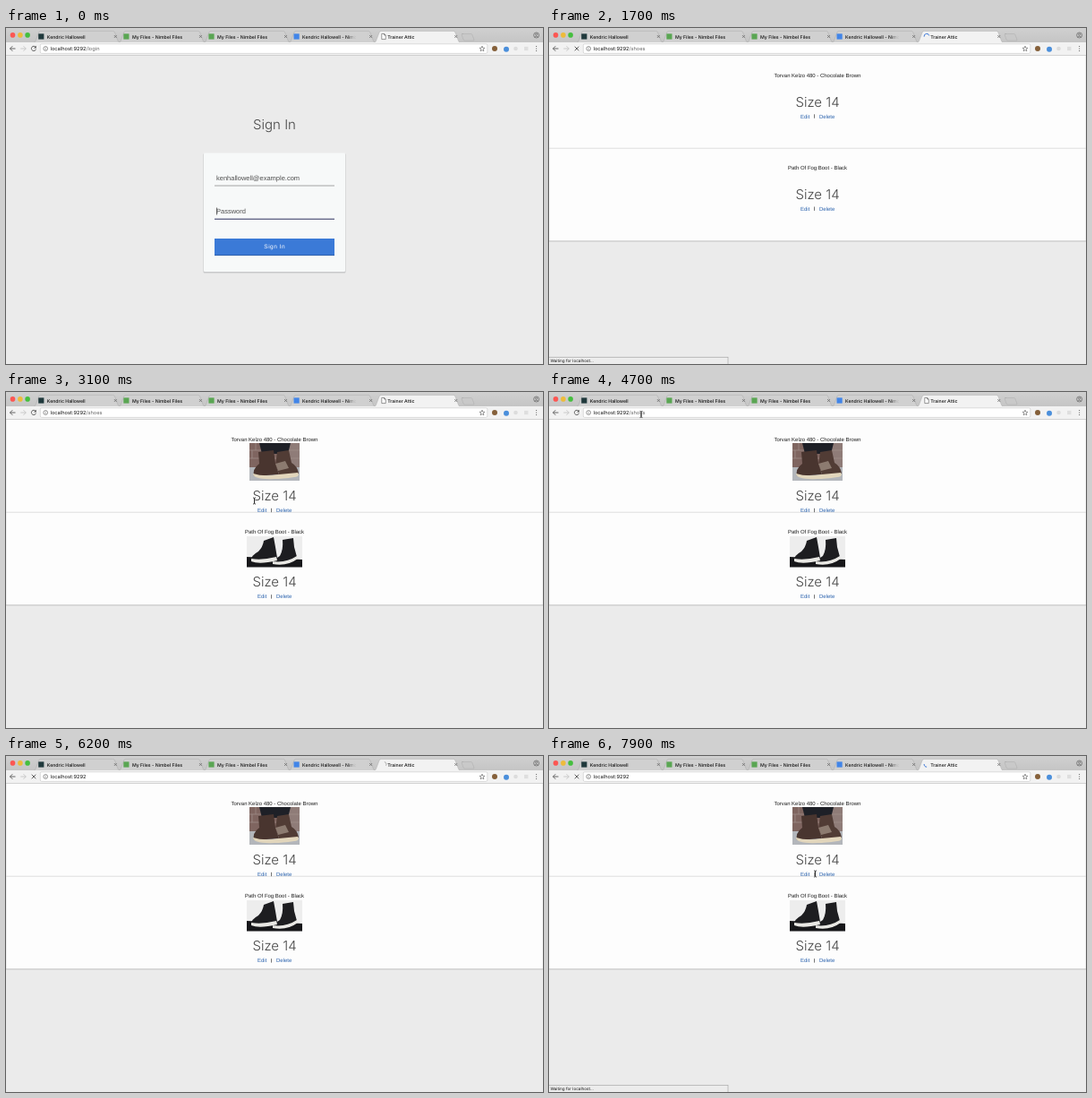
Recreate the animation shown at these times as an HTML page. Size 600 by 375 pixels, loop 8 s.

```html
<!DOCTYPE html>
<html lang="en">
<head>
<meta charset="utf-8">
<title>Trainer Attic</title>
<style>
html, body { margin: 0; width: 100%; height: 100%; overflow: hidden; background: #ebebeb }
svg { display: block; width: 600px; height: 375px; text-rendering: geometricPrecision; font-family: "Liberation Sans", Arial, sans-serif }
.ui { font-family: Inter, Roboto, sans-serif; font-size: 5.2px; font-weight: 500; fill: #111 }
.url { font-size: 5.7px; font-weight: 400 }
.tip { font-size: 4.6px; font-weight: 400 }
.big { font: 300 15px Inter, Roboto, sans-serif; fill: #444 }
.mid { text-anchor: middle }
.field { font-size: 7.5px; fill: #505050 }
.item { font-size: 5.98px; fill: #1c1c1c }
.link { fill: #2a62ad }
.line { fill: none; stroke: #555; stroke-width: .9 }
.thin { fill: none; stroke: #555; stroke-width: .6 }
</style>
</head>
<body>
<svg viewBox="0 0 600 375">
  <defs>
    <linearGradient id="strip" x2="0" y2="1"><stop stop-color="#d0d0d0"/><stop offset="1" stop-color="#c4c4c4"/></linearGradient>
    <linearGradient id="fade"><stop stop-color="#d0d0d0" stop-opacity="0"/><stop offset="1" stop-color="#d0d0d0"/></linearGradient>
    <clipPath id="crop1"><rect x="272" y="57" width="56" height="42"/></clipPath>
    <clipPath id="crop2"><rect x="269" y="161" width="62" height="34.5"/></clipPath>
  </defs>
  <rect width="600" height="375" fill="#ebebeb"/>

  <g id="login">
    <text class="big mid" x="300" y="113">Sign In</text>
    <rect x="220.5" y="140" width="159" height="133.5" rx="1" fill="#c8c9ca"/>
    <rect x="221" y="139.5" width="158" height="132.5" rx="1" fill="#f7f9f9"/>
    <text class="field" x="235" y="169.5">kenhallowell@example.com</text>
    <rect x="233" y="175.6" width="134" height=".8" fill="#8c8c8c"/>
    <text class="field" id="password" x="235" y="207"></text>
    <rect id="caret" y="200.5" width=".7" height="8" fill="#333"/>
    <rect x="233" y="212.6" width="134" height="1.4" fill="#66698a"/>
    <rect x="233" y="235" width="134" height="19" fill="#3b7ad7"/>
    <rect x="233" y="253.2" width="134" height=".9" fill="#2c5ca6"/>
    <text class="mid" x="300.2" y="246.2" font-size="6.5" letter-spacing=".5" fill="#fff">Sign In</text>
  </g>

  <g id="list">
    <rect y="30" width="600" height="208.4" fill="#bdbdbd"/>
    <rect x=".2" y="30" width="599.6" height="207.4" fill="#fdfdfd"/>
    <rect y="133.8" width="600" height=".7" fill="#d2d2d2"/>
    <g id="rows"></g>
    <g id="photos">
      <g clip-path="url(#crop1)">
        <rect x="272" y="57" width="56" height="42" fill="#7f6560"/>
        <rect x="316" y="57" width="12" height="27" fill="#8f7c78"/>
        <path d="M272 65h56M272 74h56M279 57v8M275 65v9" stroke="#a3918c" stroke-width=".7"/>
        <rect x="272" y="84" width="56" height="15" fill="#b3b6bb"/>
        <path d="M283 57h35l-3 12h-29z" fill="#1e2027"/>
        <path d="M282 67l17-2 2 15 4 12-28 2q-2-8 6-14z" fill="#49352f"/>
        <path d="M303 67l13-2 3 14q7 4 8 12l-21 3-5-12z" fill="#513c35"/>
        <path d="M301 80l11-3 4 8-12 3z" fill="#8c7b70"/>
        <path d="M276 91q12 4 29 1l21-2q3 4-4 5-14 2-22 2-24 1-24-6z" fill="#e2d6bc"/>
      </g>
      <g clip-path="url(#crop2)">
        <rect x="269" y="161" width="62" height="34.5" fill="#ededed"/>
        <path d="M269 184l62 3v9h-62z" fill="#17171a"/>
        <path d="M288 166l11-4 2 11 2 12-28 2q-2-4 7-9 5-5 6-12z" fill="#1d1d20"/>
        <path d="M309 165l12-2 1 10 3 11-8 6-18 1q0-4 7-8 4-7 3-18z" fill="#1d1d20"/>
        <path d="M274 186q12 2 28-2l1 4q-20 5-29 1zM298 189q15 2 27-6l1 3q-12 9-28 6z" fill="#e9e8e4"/>
      </g>
    </g>
  </g>

  <g id="status">
    <rect x="-.5" y="367.5" width="200.5" height="8" fill="#ececec" stroke="#aaa" stroke-width=".7"/>
    <text class="ui tip" x="1.5" y="373.2">Waiting for localhost...</text>
  </g>

  <rect width="600" height="17" fill="url(#strip)"/>
  <circle cx="7.5" cy="7.9" r="2.8" fill="#fc5753"/>
  <circle cx="15.9" cy="7.9" r="2.8" fill="#eebb3a"/>
  <circle cx="24.1" cy="7.9" r="2.8" fill="#45bf3e"/>
  <g id="tabs"></g>
  <path d="M509.5 6.5h10q1 0 1.4 1l2 5.5q.4 1-.8 1h-9.6q-1 0-1.4-1l-2-5.5q-.3-1 1.8-1z" fill="#c9c9c9" stroke="#aaa" stroke-width=".5"/>
  <g class="thin"><circle cx="592.6" cy="8" r="3"/><circle cx="592.6" cy="7.2" r="1.1"/><path d="M590.5 10.2q2.1-2 4.2 0"/></g>

  <rect y="16" width="600" height="14.5" fill="#f2f2f2"/>
  <rect y="30" width="600" height=".6" fill="#bbb"/>
  <path class="line" d="M10.5 23h-6M7.3 20.2L4.5 23l2.8 2.8"/>
  <path class="line" style="stroke:#c4c4c4" d="M16.3 23h6M19.5 20.2l2.8 2.8-2.8 2.8"/>
  <g id="reload"><path class="line" d="M33.1 21.4a2.6 2.6 0 1 0 .4 2.2"/><path d="M33.8 19.8v2.7h-2.7z" fill="#555"/></g>
  <path id="stop" class="line" d="M28.7 20.7l4.6 4.6M33.3 20.7l-4.6 4.6"/>
  <rect x="38.3" y="17.8" width="499.5" height="10.6" rx="1.5" fill="#fff" stroke="#c6c6c6" stroke-width=".6"/>
  <g class="thin"><circle cx="44.2" cy="23" r="2.4"/><path d="M44.2 22.6v1.8M44.2 21.3v.6"/></g>
  <rect id="selection" y="19.3" height="7.4" fill="#b3d4fc"/>
  <text class="ui url" x="49.5" y="25.1">localhost:9292<tspan id="path" fill="#666"></tspan></text>
  <path class="thin" d="M532 20.2l.8 2 2.1.1-1.6 1.4.5 2.1-1.8-1.2-1.8 1.2.5-2.1-1.6-1.4 2.1-.1z"/>
  <circle cx="546" cy="23" r="3" fill="#85603a"/>
  <circle cx="559" cy="23.8" r="3" fill="#4b8fdb"/>
  <circle cx="569.5" cy="23" r="2.3" fill="#dcdcdc"/>
  <rect x="579" y="20.8" width="4.4" height="4.4" fill="#dedede"/>
  <path d="M592.6 20.5v.01M592.6 23v.01M592.6 25.5v.01" stroke="#555" stroke-width="1.2" stroke-linecap="round"/>

  <g id="cursor" fill="none">
    <path d="M-1.5-3.6q1.5 0 1.5 1v5.2q0 1-1.5 1M1.5-3.6q-1.5 0-1.5 1v5.2q0 1 1.5 1" stroke="#fff" stroke-width="1.6"/>
    <path d="M-1.5-3.6q1.5 0 1.5 1v5.2q0 1-1.5 1M1.5-3.6q-1.5 0-1.5 1v5.2q0 1 1.5 1" stroke="#222" stroke-width=".8"/>
  </g>
</svg>
<script>
const LOOP = 8000;
const $ = id => document.getElementById(id);
const show = (id, on) => $(id).setAttribute('visibility', on ? 'visible' : 'hidden');
const set = (id, attrs) => { for (const k in attrs) $(id).setAttribute(k, attrs[k]); };

// Browser tabs, the active one last
const page = '<path id="page" d="M419.8 6.4h2.8l1.6 1.6v4.6h-4.4zM422.6 6.4v1.6h1.6" fill="#fff" stroke="#555" stroke-width=".6"/>' +
  '<path id="spinner" fill="none" stroke-width="1"/>';
const square = (x, color) => `<rect x="${x + 5.4}" y="6.4" width="6.2" height="6.2" fill="${color}"/>`;
const tabs = [
  ['Kendric Hallowell', '#20393c'],
  ['My Files - Nimbel Files', '#5aa653'],
  ['My Files - Nimbel Files', '#5aa653'],
  ['Kendric Hallowell - Nimbel', '#4285e8'],
  ['Trainer Attic']
];
$('tabs').innerHTML = tabs.map(([name, color], i) => {
  const x = 30.8 + 95.1 * i, active = !color;
  return `<path d="M${x} 16.2q1.6 0 2.2-1.6l3.6-9.6q.6-1.6 2-1.6h81q1.4 0 2 1.6l3.6 9.6q.6 1.6 2.2 1.6" fill="${active ? '#f2f2f2' : '#d0d0d0'}" stroke="#aaa" stroke-width=".5"/>
    ${active ? page : square(x, color)}
    <text class="ui" x="${x + 15}" y="11.6">${name}</text>
    ${i == 3 ? `<rect x="${x + 65}" y="5" width="9" height="9" fill="url(#fade)"/><rect x="${x + 74}" y="5" width="14" height="9" fill="#d0d0d0"/>` : ''}
    <path class="thin" d="M${x + 90} 8l3 3m0-3l-3 3"/>`;
}).join('');

const row = (name, top, sizeY, linkY) => `
  <text class="item mid" x="300" y="${top}">${name}</text>
  <text class="big mid" x="300" y="${sizeY}">Size 14</text>
  <g class="item"><text class="link" x="281" y="${linkY}">Edit</text>
  <rect x="296.2" y="${linkY - 4.2}" width=".6" height="4.4"/>
  <text class="link" x="302" y="${linkY}">Delete</text></g>`;
const rows = loaded =>
  row('Torvan Kelzo 480 - Chocolate Brown', 55, loaded ? 121.3 : 87.5, loaded ? 134 : 100.5) +
  row('Path Of Fog Boot - Black', 158.3, loaded ? 217.3 : 190.8, loaded ? 230.4 : 203.7);

// Pointer paths: [time, x, y]
const moves = [
  [[2800, 298, 150], [3100, 277.5, 121.5], [3700, 277.5, 121.5], [4600, 103, 25], [4800, 103, 25], [5000, 90, 24], [5400, 112, 24]],
  [[7300, 137, 25], [7400, 137, 25], [7800, 297.5, 131.5], [8000, 297.5, 131.5]]
];
const between = (t, a, b) => t >= a && t < b;

function pointer(t) {
  for (const pts of moves)
    for (let i = 1; i < pts.length; i++) {
      const [a, x, y] = pts[i - 1], [b, u, v] = pts[i];
      if (!between(t, a, b)) continue;
      const k = (t - a) / (b - a), e = k * k * (3 - 2 * k);
      return [x + (u - x) * e, y + (v - y) * e];
    }
}

function arc(from, sweep) {
  const at = d => {
    const r = d * Math.PI / 180;
    return (422 + 2.9 * Math.cos(r)).toFixed(2) + ' ' + (9.3 + 2.9 * Math.sin(r)).toFixed(2);
  };
  return `M${at(from)}A2.9 2.9 0 ${sweep > 180 ? 1 : 0} 1 ${at(from + sweep)}`;
}

let wasLoaded;
function draw(t) {
  const listed = t >= 1700, loaded = t >= 2200;
  show('login', !listed);
  show('list', listed);
  show('photos', loaded);
  if (loaded !== wasLoaded) $('rows').innerHTML = rows(wasLoaded = loaded);

  const typed = Math.max(0, Math.min(8, Math.floor(t / 100) - 1));
  $('password').textContent = typed ? '•'.repeat(typed) : 'Password';
  set('caret', { x: 235 + typed * 2.63 });
  show('caret', !listed && !between(t, 1100, 1500));

  // Requests: grey while waiting, blue while receiving
  const waiting = between(t, 1000, 1300) || between(t, 5700, 6300);
  const receiving = between(t, 1300, 2400) || t >= 6300;
  const busy = waiting || receiving;
  show('stop', busy);
  show('reload', !busy);
  show('page', !busy);
  show('spinner', busy);
  const age = t - (t < 3000 ? 1300 : 6300);
  set('spinner', waiting
    ? { d: arc(-.36 * t, 100), stroke: '#aaa' }
    : { d: arc(80 + .23 * age, 15 + 120 * (1 - Math.cos(age / 1333 * 2 * Math.PI))), stroke: '#3d78d8' });
  show('status', between(t, 1700, 2400) || t >= 6300);

  $('path').textContent = t < 1300 ? '/login' : t < 5500 ? '/shoes' : '';
  show('selection', between(t, 5000, 5500));
  set('selection', { x: 90, width: 18 * Math.max(0, Math.min(1, (t - 5000) / 350)) });

  const pos = pointer(t);
  show('cursor', pos);
  if (pos) set('cursor', { transform: `translate(${pos})` });
}

function tick() {
  draw(Math.floor(performance.now() % LOOP / 100) * 100);
  requestAnimationFrame(tick);
}
tick();
</script>
</body>
</html>
```
